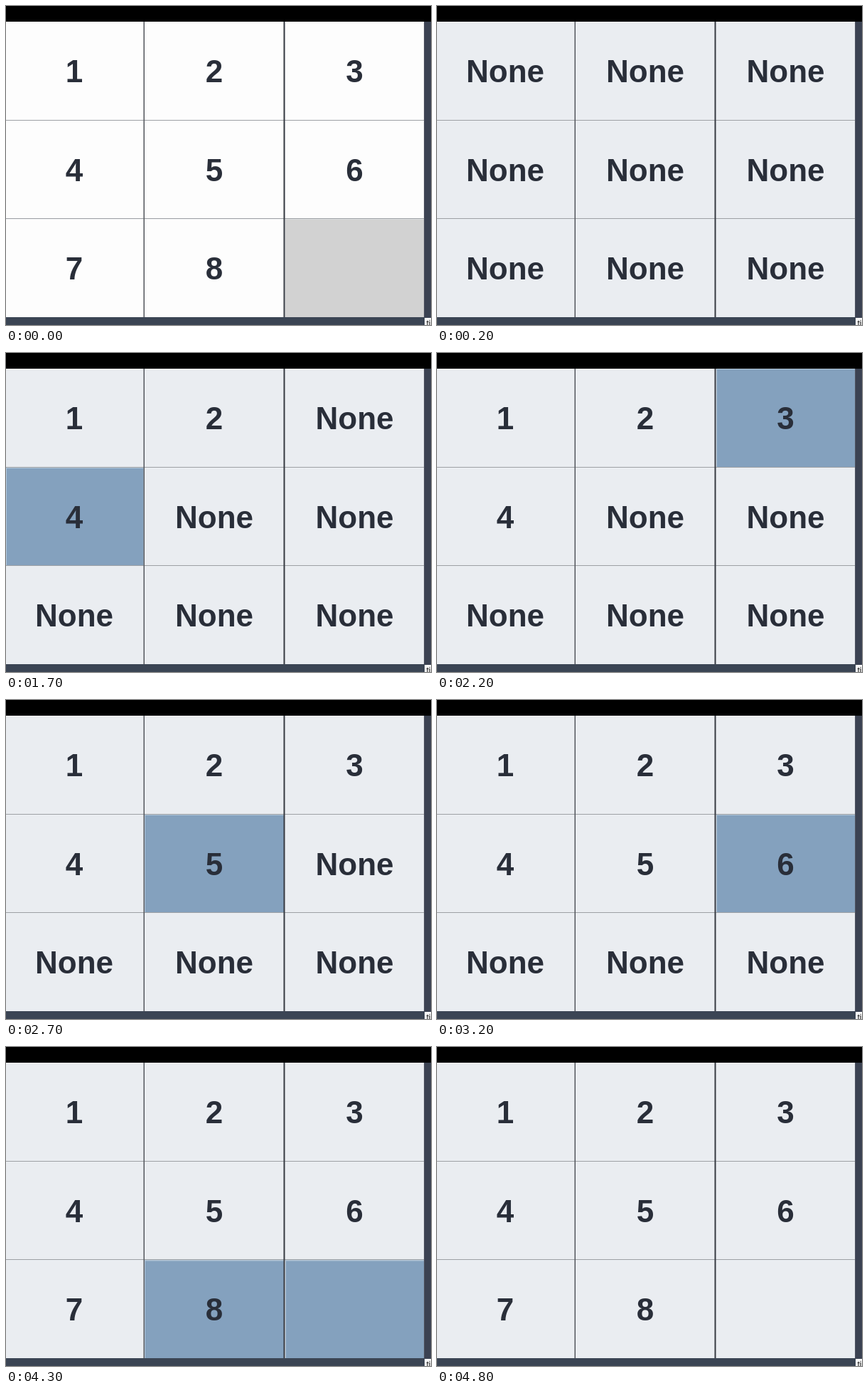
Write an HTML page that moves like this. It is 598x448 px and loops after 4.9 s.

```html
<!DOCTYPE html>
<html lang="en">
<head>
<meta charset="utf-8">
<title>Number grid</title>
<style>
html, body { margin: 0; width: 100%; height: 100%; overflow: hidden; background: #000; }
svg { display: block; width: 598px; height: 448px; }
.label { font: bold 44px "Liberation Sans", Arial, sans-serif; text-anchor: middle; fill: #292e39; }
.small { font: 12px "Liberation Sans", Arial, sans-serif; fill: #111; }
</style>
</head>
<body>
<svg id="stage" viewBox="0 0 598 448" xmlns="http://www.w3.org/2000/svg"></svg>
<script>
const LOOP = 4900, START = 100;
const PLAIN = "#eaedf1", PAPER = "#fdfdfd", EMPTY = "#d2d2d2", ACTIVE = "#84a1be";
// When each cell is filled in and when its highlight ends
const ON = [700, 1200, 2200, 1700, 2700, 3200, 3800, 4300, 3800];
const OFF = [1200, 1700, 2700, 2200, 3200, 3800, 4300, 4800, 4800];
const COLS = [[0, 193.5, 96], [195, 196, 293], [393, 195.5, 490.5]];
const ROWS = [[22, 138, 107], [161, 137.5, 245.5], [299.5, 137.5, 384]];

const stage = document.getElementById("stage");

function add(tag, attrs, text = "") {
  const el = document.createElementNS(stage.namespaceURI, tag);
  for (const key in attrs) el.setAttribute(key, attrs[key]);
  el.textContent = text;
  return stage.appendChild(el);
}

function box(x, y, width, height, fill) {
  return add("rect", { x, y, width, height, fill });
}

box(0, 0, 598, 448, "#3b4252");
box(0, 22, 588.5, 415, PLAIN);

const cells = ON.map((_, i) => {
  const [x, width, cx] = COLS[i % 3];
  const [y, height, base] = ROWS[Math.floor(i / 3)];
  return {
    back: box(x, y, width, height, PLAIN),
    rim: add("path", {
      d: `M${x + 0.5} ${y + height}V${y + 0.5}H${x + width}`,
      fill: "none", stroke: "#b4c8da", "stroke-width": 1
    }),
    label: add("text", { x: cx, y: base, class: "label" })
  };
});

box(0, 160, 588, 1, "#9da0a4");
box(0, 298, 588, 1, "#9da0a4");
box(193.5, 22, 1.5, 415, "#55585e");
box(390.5, 22, 2, 415, "#363a42");
box(0, 437, 589, 11, "#3b4554");
box(588, 22, 1, 415, "#545866");
box(0, 0, 598, 22, "#000");
box(589, 438, 9, 10, "#fafafa");
add("text", { x: 591.5, y: 450, class: "small" }, "ti");

function draw(t) {
  const intro = t < START;
  cells.forEach(({ back, rim, label }, i) => {
    const lit = t >= ON[i] && t < OFF[i];
    const filled = intro || t >= ON[i];
    const idle = intro ? (i === 8 ? EMPTY : PAPER) : PLAIN;
    back.setAttribute("fill", lit ? ACTIVE : idle);
    rim.setAttribute("visibility", lit ? "visible" : "hidden");
    label.textContent = !filled ? "None" : i === 8 ? "" : i + 1;
  });
}

let origin;
function tick(now) {
  origin ??= now;
  draw((now - origin) % LOOP);
  requestAnimationFrame(tick);
}
draw(0);
requestAnimationFrame(tick);
</script>
</body>
</html>
```
